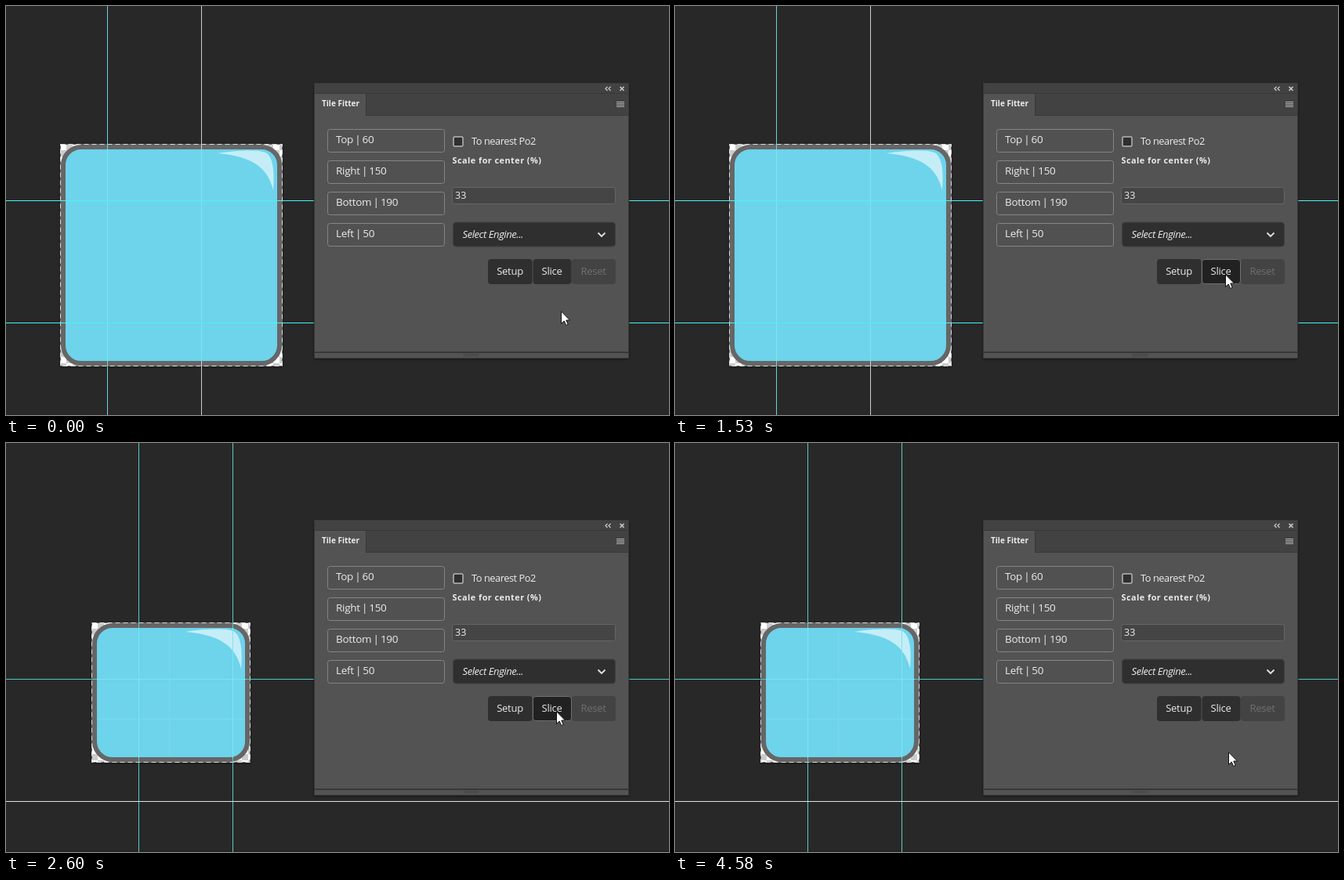
An HTML page that plays this animation: 846 px wide and 522 px high, repeating every 4610 ms.

```html
<!DOCTYPE html>
<html lang="en">
<head>
<meta charset="utf-8">
<title>Slice panel</title>
<style>
  html, body { margin: 0; width: 100%; height: 100%; overflow: hidden; background: #282828; }
  svg { display: block; width: 846px; height: 522px; }
  text { font-family: "Open Sans", "Noto Sans", sans-serif; fill: #ececec; }

  .field rect { fill: #515151; stroke: #858585; }
  .field text { font-size: 13.5px; letter-spacing: -.3px; word-spacing: -1px; }
  .button rect { fill: #2f2f2f; }
  .button text { font-size: 13px; letter-spacing: -.25px; text-anchor: middle; }
  .button.off rect { fill: #434343; }
  .button.off text { fill: #707070; }

  .art { fill: #6dd4eb; stroke: #666; stroke-width: 6; }
  .shine { fill: #c5edf8; }
  .ants { fill: none; stroke: #666; }
  .ants.dash { stroke: #ddd; stroke-dasharray: 6 4; }
  .guide { fill: none; shape-rendering: crispEdges; }

  .before, .after, .hover, .arrow, .busy { animation: 4610ms step-end infinite; }
  .before { animation-name: before; }
  .after  { animation-name: after; }
  .hover  { animation-name: hover; }
  .arrow  { animation-name: arrow; }
  .busy   { animation-name: busy; }
  .spin   { animation: spin 4610ms step-end infinite; }
  .pointer { animation: move 4610ms step-end infinite; }

  @keyframes before { 0% { visibility: visible } 56.399%, 100% { visibility: hidden } }
  @keyframes after { 0% { visibility: hidden } 56.399%, 100% { visibility: visible } }
  @keyframes hover {
    0% { visibility: hidden }
    26.681% { visibility: visible }
    86.3%, 100% { visibility: hidden }
  }
  @keyframes arrow {
    0% { visibility: visible }
    47.072% { visibility: hidden }
    56.399%, 100% { visibility: visible }
  }
  @keyframes busy {
    0% { visibility: hidden }
    47.072% { visibility: visible }
    56.399%, 100% { visibility: hidden }
  }
  @keyframes spin {
    0% { transform: rotate(180deg) }
    47.072% { transform: rotate(180deg); animation-timing-function: steps(3, end) }
    53.79%, 100% { transform: rotate(0deg) }
  }
  @keyframes move {
    0% { transform: translate(708px, 389px) }
    14.967% { transform: translate(708px, 389px); animation-timing-function: steps(9, start) }
    23.688% { transform: translate(704px, 367px) }
    24.946% { transform: translate(704px, 367px); animation-timing-function: steps(2, start) }
    26.681% { transform: translate(703px, 356px); animation-timing-function: steps(6, start) }
    34.447% { transform: translate(702px, 342px) }
    81.996% { transform: translate(702px, 343px) }
    82.863% { transform: translate(702px, 343px); animation-timing-function: steps(9, start) }
    93.449% { transform: translate(702px, 378px) }
    93.492% { transform: translate(702px, 378px); animation-timing-function: steps(5, start) }
    100% { transform: translate(706px, 394px) }
  }
</style>
</head>
<body>
<svg viewBox="0 0 846 522">
  <defs>
    <pattern id="checker" width="16" height="16" patternUnits="userSpaceOnUse">
      <path fill="#fff" d="M0 0H16V16H0Z"/>
      <path fill="#ccc" d="M8 0H16V8H8ZM0 8H8V16H0Z"/>
    </pattern>
    <filter id="shadow" x="-10%" y="-10%" width="120%" height="120%">
      <feDropShadow dx="0" dy="1" stdDeviation="1.5" flood-color="#000" flood-opacity=".5"/>
    </filter>
    <path id="shine" d="M-83 12C-60 8-31 7-22 11C-12 16-10 36-12 59C-20 27-42 16-83 12Z"/>
  </defs>

  <rect width="846" height="522" fill="#282828"/>
  <rect y="521" width="846" height="1" fill="#2b2024"/>

  <g class="before">
    <g transform="translate(69 176)">
      <rect width="284" height="284" fill="url(#checker)" filter="url(#shadow)"/>
      <rect class="art" x="4" y="4" width="276" height="276" rx="23"/>
      <use href="#shine" x="284" class="shine"/>
      <rect class="ants" x=".5" y=".5" width="283" height="283"/>
      <rect class="ants dash" x=".5" y=".5" width="283" height="283"/>
    </g>
    <path class="guide" stroke="#6fd3dc" d="M129.5 0V522"/>
    <path class="guide" stroke="#cfcfcf" d="M249.5 0V522"/>
    <path class="guide" stroke="#7be6f1" d="M129.5 183V454M249.5 183V454"/>
    <path class="guide" stroke="#48f3f3" d="M0 248.5H846M0 404.5H846"/>
  </g>

  <g class="after">
    <g transform="translate(109 229)">
      <rect width="203" height="179" fill="url(#checker)" filter="url(#shadow)"/>
      <rect class="art" x="4" y="4" width="195" height="171" rx="23"/>
      <path class="guide" stroke="#7cd8ec" d="M99.5 7V172M7 123.5H196"/>
      <use href="#shine" x="203" class="shine"/>
      <rect class="ants" x=".5" y=".5" width="202" height="178"/>
      <rect class="ants dash" x=".5" y=".5" width="202" height="178"/>
    </g>
    <path class="guide" stroke="#5bc9c8" d="M169.5 0V522M289.5 0V522"/>
    <path class="guide" stroke="#4bc6c6" d="M0 301.5H846"/>
    <path class="guide" stroke="#7be6f1" d="M169.5 236V402M289.5 236V402M116 301.5H306"/>
    <path class="guide" stroke="#dde6dd" d="M0 457.5H846"/>
  </g>

  <!-- panel frame -->
  <rect x="393" y="98" width="402" height="352" fill="#383838" filter="url(#shadow)"/>
  <path fill="#424242" d="M394 99H794V111H394ZM460 112H794V139H460Z"/>
  <path fill="#535353" d="M394 112H459V140H794V441H394ZM394 443H794V449H394Z"/>
  <path fill="none" stroke="#383838" stroke-dasharray="1 1" d="M584 444.5H603M584 446.5H603"/>
  <text x="403" y="128" font-size="10" font-weight="700">Tile Fitter</text>
  <g fill="none" stroke="#c8c8c8">
    <path stroke-width="1.3" d="M767.5 103L765 105.500L767.5 108M771.500 103L769 105.500L771.500 108"/>
    <path stroke-width="1.7" d="M783.500 103L788.500 108M788.500 103L783.500 108"/>
    <path stroke="#b0b0b0" d="M779 122.500H789M779 124.500H789M779 126.500H789M779 128.500H789"/>
  </g>

  <!-- margins -->
  <g class="field"><rect x="410.5" y="157.5" width="149" height="29" rx="3"/><text x="421" y="175">Top | 60</text></g>
  <g class="field"><rect x="410.5" y="197.5" width="149" height="29" rx="3"/><text x="421" y="215">Right | 150</text></g>
  <g class="field"><rect x="410.5" y="237.5" width="149" height="29" rx="3"/><text x="421" y="255">Bottom | 190</text></g>
  <g class="field"><rect x="410.5" y="277.5" width="149" height="29" rx="3"/><text x="421" y="295">Left | 50</text></g>

  <!-- options -->
  <rect x="571" y="167" width="12" height="12" rx="1.5" fill="#2f2f2f" stroke="#b8b8b8" stroke-width="1.5"/>
  <text x="594" y="177" font-size="12.8" letter-spacing="-.45">To nearest Po2</text>
  <text x="569.5" y="201" font-size="10.8" font-weight="700" letter-spacing=".5">Scale for center (%)</text>
  <rect x="569.5" y="231.5" width="208" height="21" rx="3" fill="#454545" stroke="#666"/>
  <text x="573" y="246" font-size="12.5">33</text>
  <rect x="570.5" y="276" width="207" height="31" rx="4" fill="#2f2f2f" stroke="#404040"/>
  <text x="582.5" y="296" font-size="13" font-style="italic" letter-spacing="-.4">Select Engine...</text>
  <path fill="none" stroke="#e4e4e4" stroke-width="1.8" d="M755.5 289.500L760 294L764.500 289.500"/>

  <!-- actions -->
  <g class="button"><rect x="615" y="323" width="56.500" height="32" rx="4"/><text x="643" y="343">Setup</text></g>
  <g class="button"><rect x="672.500" y="323" width="49" height="32" rx="4"/></g>
  <rect class="hover" x="672.500" y="323.500" width="49" height="31" rx="3.500" fill="#212121" stroke="#707070"/>
  <g class="button"><text x="696.500" y="343">Slice</text></g>
  <g class="button off"><rect x="722" y="323" width="56" height="32" rx="4"/><text x="749.500" y="343">Reset</text></g>

  <g class="busy" transform="translate(703 343.500)">
    <g class="spin">
      <circle cx="8" cy="0" r="3" fill="#e6e6e6"/>
      <circle cx="4" cy="6.9" r="3" fill="#c8c8c8"/>
      <circle cx="-4" cy="6.9" r="3" fill="#a0a0a0"/>
      <circle cx="-8" cy="0" r="3" fill="#707070"/>
      <circle cx="-4" cy="-6.9" r="3" fill="#4c4c4c"/>
      <circle cx="4" cy="-6.9" r="3" fill="#2e2e2e"/>
    </g>
  </g>

  <g class="pointer">
    <path class="arrow" fill="#fff" stroke="#111" d="M.5 .8V16.500L4.200 13L6.700 18.500L9.200 17.400L6.800 12H11.500Z"/>
  </g>
</svg>
</body>
</html>
```
